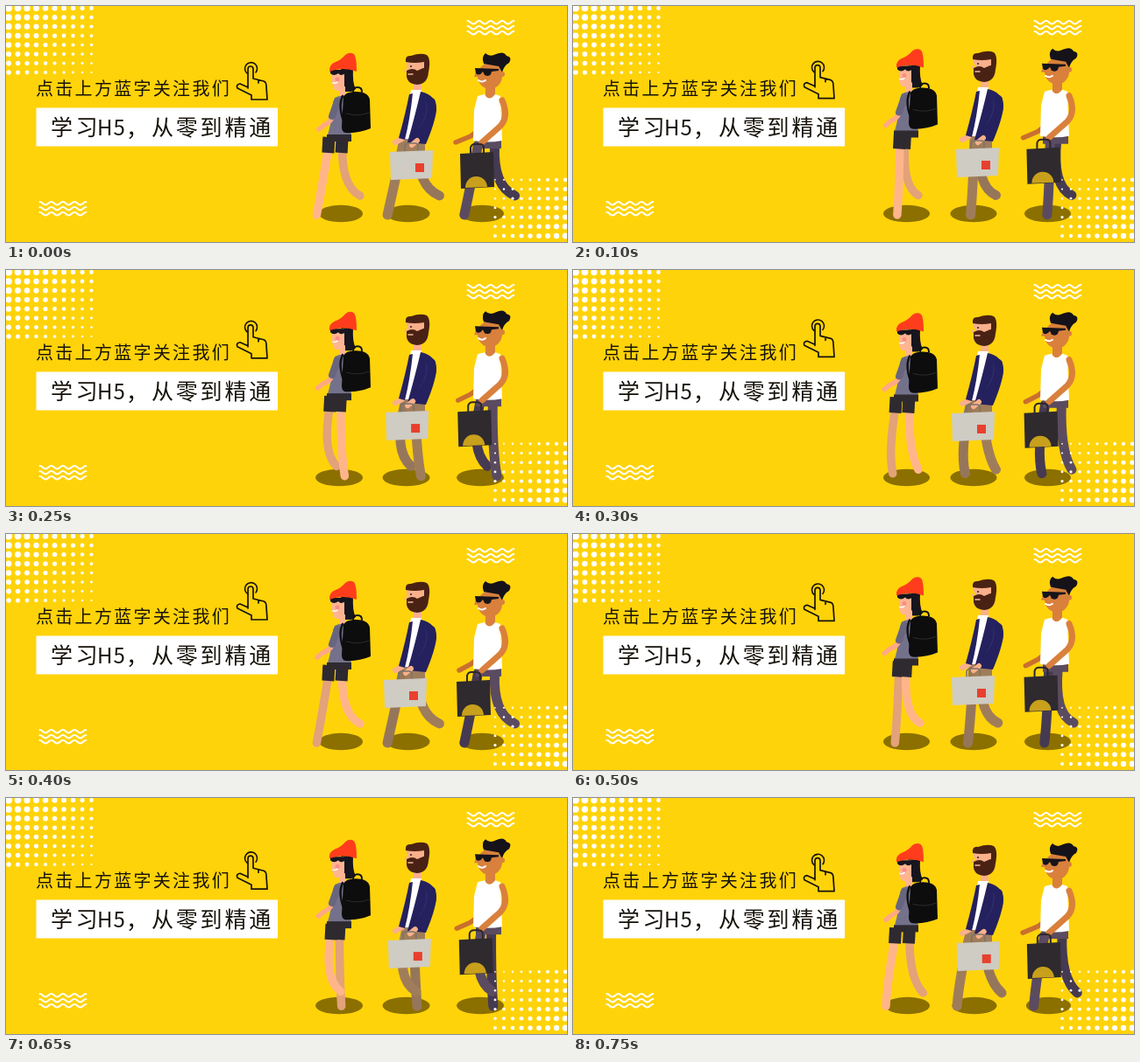
These frames come from a looping animation (640 by 270 pixels, 0.8 s). An HTML page with a canvas:

```html
<!DOCTYPE html>
<html lang="zh">
<head>
<meta charset="utf-8">
<style>
  html, body { margin: 0; height: 100%; overflow: hidden; background: #ffd30a; }
  canvas { display: block; }
</style>
</head>
<body>
<canvas id="stage" width="640" height="270"></canvas>
<script>
const ctx = document.getElementById('stage').getContext('2d');
const LOOP = 800, STEP = 50, TAU = Math.PI * 2;

// One leg over a loop: time, foot x from the hips, foot y, knee x from the hips
const GAIT = [
  [0, -24, 239, -17], [100, -8, 239, -5], [250, 9, 238, 6], [350, 27, 222, 8], [400, 31, 217, 7],
  [500, 21, 216, 0], [650, 5, 222, -18], [740, -21, 238, -19], [800, -24, 239, -17]
];

function fill(color, path) {
  ctx.fillStyle = color;
  ctx.fill(new Path2D(path));
}

function stroke(color, width, path) {
  ctx.strokeStyle = color;
  ctx.lineWidth = width;
  ctx.stroke(new Path2D(path));
}

function oval(color, x, y, rx, ry = rx) {
  ctx.fillStyle = color;
  ctx.beginPath();
  ctx.ellipse(x, y, rx, ry, 0, 0, TAU);
  ctx.fill();
}

function at(x, y, draw) {
  ctx.save();
  ctx.translate(x, y);
  draw();
  ctx.restore();
}

function label(text, x, y, size, spacing) {
  ctx.font = `${size}px "Noto Sans CJK SC", "Noto Sans CJK", sans-serif`;
  ctx.letterSpacing = spacing + 'px';
  ctx.fillStyle = '#17120a';
  ctx.fillText(text, x, y);
}

// Grid of dots that shrink away from the corner (x, y)
function dots(x, y, gapX, gapY, cols, rows, radius) {
  for (let i = 0; i < cols; i++) {
    for (let j = 0; j < rows; j++) {
      oval('#fff', x + i * gapX, y + j * gapY, radius - 0.18 * (i + j));
    }
  }
}

function waves(x, y) {
  for (let row = 0; row < 3; row++) {
    const path = `M${x} ${y + row * 6}` + 'c3.3 0 3.3 3.6 6.6 3.6s3.3 -3.6 6.6 -3.6'.repeat(4);
    stroke('#fff', 2, path);
  }
}

function leg(time, x, y, spread, color, width, reach, shorts) {
  const t = (time + LOOP) % LOOP;
  const k = GAIT.findIndex(key => key[0] > t);
  const a = GAIT[k - 1], b = GAIT[k];
  const f = (t - a[0]) / (b[0] - a[0]);
  const [, foot, footY, knee] = a.map((v, i) => v + (b[i] - v) * f);
  const hipX = x - spread * Math.cos(TAU * (t + 40) / LOOP);
  stroke(color, width, `M${hipX} ${y}Q${x + knee * reach} 206 ${x + foot * reach} ${footY}`);
  if (shorts) {
    ctx.lineCap = 'butt';
    stroke(shorts, 14, `M${hipX} ${y - 8}L${hipX - 1} ${y + 10}`);
    ctx.lineCap = 'round';
  }
}

function woman(swing) {
  fill('#17151d', 'M382 66H396Q395 82 399 89L394 92H384Q380 90 384 82z');
  fill('#ffb592', 'M372 67H386V86Q382 93 375 90Q371 86 372 67zM380 86H387V103H380z');
  oval('#fb8d86', 378, 78, 2.5);
  stroke('#fff', 1.5, 'M373 82q3 1 5 -1');
  fill('#17151d', 'M370 67H387V71Q382 75 379 71Q374 75 370 71z');
  fill('#ff3d1c', 'M369 69Q368 61 376 58Q383 55 387 50Q392 46 397 49Q400 52 400 69Q384 63 369 69z');
  fill('#74728a', 'M375 99Q382 95 390 98L394 145H366Q373 122 373 104z');
  stroke('#ffa983', 5.5, `M374 114Q372 127 ${362 + swing} 130L${356 + swing} 135`);
  stroke('#68667e', 8, 'M378 103L372 120');
  fill('#2e2a30', 'M366 141H394V149H366z');
  stroke('#111', 2, 'M396 93Q396 87 401 87T406 92');
  stroke('#111', 2.5, 'M384 97Q378 110 387 130');
  fill('#0d0d0e', 'M385 98Q387 92 399 92Q413 92 415 101L416 134Q402 140 387 139Q383 138 383 132z');
  stroke('#2c2c2e', 1, 'M388 117Q402 121 414 116');
}

function man(swing, bagY) {
  fill('#f9b08b', 'M457 58H481V80H457zM465 82H474V99H465zM458 64L454 71H459z');
  fill('#4a2214', 'M456 60Q455 52 462 53Q473 49 480 52Q485 56 482 72H477V60Q466 62 456 60z');
  fill('#4a2214', 'M457 70Q464 66 469 70L476 67H482Q483 85 469 86Q456 85 457 73z');
  stroke('#f4b8a0', 1.5, 'M459 74h5');
  oval('#222', 462, 65, 1);
  fill('#a07d5a', 'M455 148H478V166H455z');
  stroke('#f9b08b', 6, 'M452 148L444 152');
  fill('#fff', 'M462 92L474 92L464 148H452Q458 120 462 92z');
  fill('#24215e', 'M473 94Q490 97 491 114Q490 128 479 154L458 152Q467 120 473 94z');
  fill('#24215e', 'M460 97L464 96Q461 125 455 149L448 147Q456 118 460 97z');
  stroke('#38356f', 1, 'M480 106Q482 121 472 135');
  stroke('#24215e', 10, 'M485 106Q490 122 469 147');
  at(434.5 + swing * 3.5, bagY, () => {
    stroke('#f9b08b', 6, 'M31 -1L25 4');
    stroke('#77736a', 1.5, 'M17 13V5Q18 2 22 2H28Q32 2 32 5V13');
    fill('#cfccc3', 'M0 12L49 10L48 42L1 44z');
    fill('#e8402f', 'M29 25H39V35H29z');
  });
}

function friend(swing, bagY) {
  oval('#d9803c', 552, 73, 14, 15);
  fill('#d9803c', 'M547 82H558V103H547zM537 66L534 74H540z');
  fill('#15121a', 'M545 59Q542 51 547 47Q552 52 559 48Q568 44 571 50Q578 51 574 58Q568 61 566 69L562 62z');
  oval('#d9803c', 566, 71, 3);
  fill('#17141a', 'M535 64L562 65V67L554 68Q553 75 546 72L544 68Q540 74 536 70z');
  stroke('#fff', 2, 'M539 78Q543 81 547 78');
  fill('#5b4b60', 'M536 145H565V156H536z');
  stroke('#c9702e', 5.5, `M538 136L530 142L${515 - swing * 2} 149`);
  fill('#fff', 'M538 96L546 94Q551 103 558 94L564 96L566 147Q550 150 533 147L534 112z');
  stroke('#d9803c', 7, 'M566 101Q575 122 561 133L543 149');
  at(516 + swing * 2, bagY, () => {
    stroke('#2b272b', 2, 'M12 13V4Q13 0 17 0H22Q27 0 27 4V13');
    fill('#2e2a2e', 'M0 11L38 9L39 49L1 51z');
    fill('#c9a01c', 'M6 50A12 12 0 0 1 31 49z');
  });
}

function pointer(wave) {
  at(279, 61.5 + wave * 4.5, () => {
    stroke('#17120a', 1.6, 'M-4 11A7 7 0 1 1 6 10');
    stroke('#17120a', 1.7, 'M-3 28V6Q-3 3 0 3T3 6V17L15 20Q18 21 18 26L19 41H1V36L-15 28Q-17 24 -12 23L-3 27M9 19V22');
  });
}

function draw(time) {
  const wave = Math.cos(TAU * time / LOOP);
  const dip = ((1 + Math.cos(TAU * time / LOOP * 2)) / 2) ** 2;
  const pace = time + 15 * Math.sin(TAU * time / LOOP);

  ctx.lineCap = ctx.lineJoin = 'round';
  ctx.fillStyle = '#ffd30a';
  ctx.fillRect(0, 0, 640, 270);
  dots(3, 2.5, 10.5, 10.5, 10, 8, 4);
  waves(526.5, 17);
  waves(38.5, 224);

  label('点击上方蓝字关注我们', 34, 102, 20, 2.3);
  ctx.fillStyle = '#fff';
  ctx.fillRect(34.5, 116.5, 275.5, 44);
  label('学习', 51, 148, 25, 3.5);
  label('H5', 104, 148, 24, 1);
  label('，', 137, 149, 25, 0);
  label('从零到精通', 166, 148, 25, 2.8);
  pointer(wave);

  for (const x of [380, 456.5, 541]) oval('#8b7000', x + 2 * dip, 237.5, 27 - 2 * dip, 9.8);

  const walkers = [
    [woman, 376, 6, 8, '#e3a279', '#ffb58a', 9.5, 0.9, '#2e2a30'],
    [man, 461, 4, 8, '#96765a', '#a07d5a', 11, 1.08],
    [friend, 548, 7, 10, '#453a52', '#5b4b60', 11, 1.05]
  ];
  for (const [body, x, drop, spread, far, near, width, reach, shorts] of walkers) {
    const y = drop * dip;
    leg(pace + LOOP / 2, x, 152 + y, spread, far, width, reach, shorts);
    leg(pace, x, 152 + y, spread, near, width, reach, shorts);
    at(0, y, () => body(wave, 151));
  }
  dots(638, 263, -10, -10.7, 9, 7, 3.4);
}

function tick(now) {
  draw(Math.floor(now % LOOP / STEP) * STEP);
  requestAnimationFrame(tick);
}
requestAnimationFrame(tick);
</script>
</body>
</html>
```
